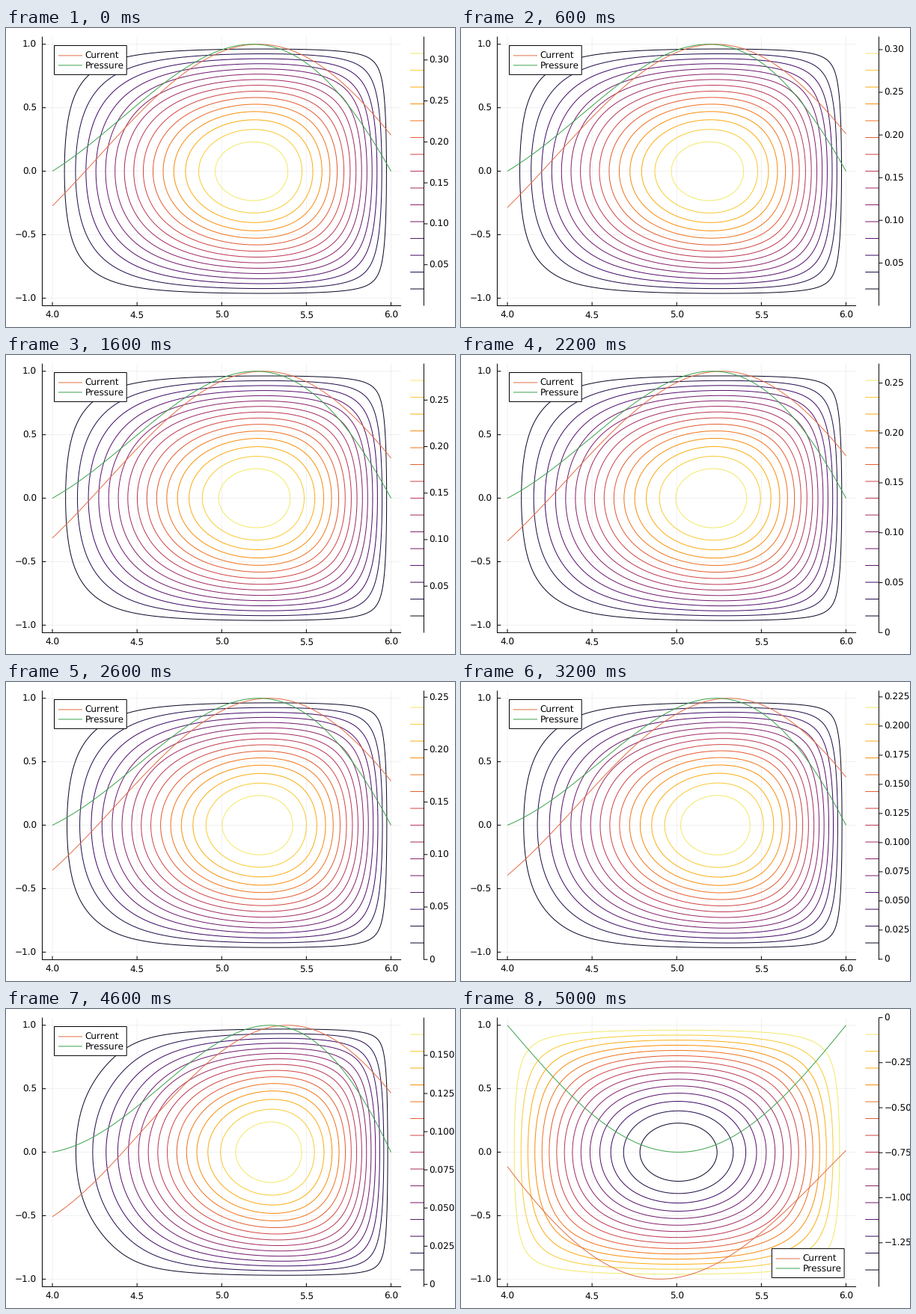
A matplotlib script that plays this animation: 600x400 px, repeating every 10 s.

```python
import math

import matplotlib.pyplot as plt
import numpy as np
from matplotlib.animation import FuncAnimation
from matplotlib.patches import Rectangle

plt.rcParams.update({"path.snap": False, "text.hinting": "none",
                     "text.hinting_factor": 1,
                     "lines.solid_capstyle": "butt"})

W, H, DPI = 600, 400, 100
PX = 72 / DPI                      # one pixel in points
FONT = dict(family="DejaVu Sans", size=12.0 * PX, color="black")
LEFT, TOP, SIDE_X, SIDE_Y = 48.45, 11.55, 479.6, 360
BOTTOM, RIGHT = TOP + SIDE_Y, LEFT + SIDE_X
ORANGE, GREEN = "#E36F47", "#3DA44E"
BAR_X0, BAR_X1 = 540.2, 558.4
LEVELS = 15
SWEEP = 25                         # frames before the jump to the last state
ZERO_BELOW = 0.27                  # the bar marks zero only for weaker peaks

# Flux equation: R d/dR(1/R dpsi/dR) + d2psi/dz2 = -(a R^2 - b + c psi)
r = np.linspace(4, 6, 161)
z = np.linspace(-1, 1, 161)
MID = len(z) // 2


def px(radius):
    return LEFT + SIDE_X * (0.5 + (radius - 5) / 2.12)


def py(height):
    return TOP + SIDE_Y * (0.5 - height / 2.12)


def responses(c, modes=24):
    """Flux driven by the sources R^2 and 1, as a cosine series in z."""
    inner, h = r[1:-1], r[1] - r[0]
    n = len(inner)
    op = (np.diag(np.full(n, -2 / h**2))
          + np.diag(1 / h**2 - 1 / (2 * h * inner[:-1]), 1)
          + np.diag(1 / h**2 + 1 / (2 * h * inner[1:]), -1))
    src = np.stack([inner**2, np.ones(n)], axis=1)
    out = np.zeros((2, len(z), len(r)))
    for m in range(modes):
        mu = (2 * m + 1) * math.pi / 2
        amp = 2 * (-1) ** m / mu
        g = np.linalg.solve(-op - (c - mu**2) * np.eye(n), amp * src)
        for i in range(2):
            out[i, :, 1:-1] += np.outer(np.cos(mu * z), g[:, i])
    out[:, [0, -1], :] = 0
    return out


def balance(a, c, peak, basis):
    """Choose b so that the flux on the axis equals peak."""
    u, v = basis
    extreme = np.max if peak > 0 else np.min
    lo, hi = 0.0, 4.0
    for _ in range(45):
        b = (lo + hi) / 2
        if extreme(a * u[MID] - b * v[MID]) > peak:
            lo = b
        else:
            hi = b
    psi = a * u - b * v
    current = a * r - b / r + c * psi[MID] / r
    pressure = psi[MID] - psi[MID].min()
    return psi, current / np.abs(current).max(), pressure / pressure.max()


def build_states():
    a, c = 0.0454, 4.688
    basis = responses(c)
    peaks = np.interp(np.arange(SWEEP), [0, 3, 8, 13, 19, 23, 24],
                      [0.3285, 0.3152, 0.2892, 0.2562, 0.2045, 0.1747, 0.167])
    states = [balance(a, c, p, basis) for p in peaks]
    a, c = 0.0393, 4.631
    states.append(balance(a, c, -1.494, responses(c)))
    return states


STATES = build_states()

fig = plt.figure(figsize=(W / DPI, H / DPI), dpi=DPI, facecolor="white")
ax = fig.add_axes([0, 0, 1, 1])
ax.set_xlim(0, W)
ax.set_ylim(H, 0)
ax.axis("off")


def line(xs, ys, color="black", **kw):
    return ax.plot(xs, ys, color=color, lw=PX, **kw)[0]


def label(x, y, text, ha="left", **kw):
    return ax.text(x, y + 4.3, text, ha=ha, va="baseline", **FONT, **kw)


def number(value, digits):
    return f"{value:.{digits}f}".replace("-", "\u2212")


def draw_frame():
    for t in np.arange(4, 6.1, 0.5):
        x = px(t)
        line([x, x], [TOP, BOTTOM], alpha=0.06, zorder=1)
        line([x, x], [BOTTOM, BOTTOM - 4.8], zorder=4)
        label(x, 383.3, number(t, 1), ha="center")
    for t in np.arange(-1, 1.1, 0.5):
        y = py(t)
        line([LEFT, RIGHT], [y, y], alpha=0.06, zorder=1)
        line([LEFT, LEFT + 4.8], [y, y], zorder=4)
        label(41.2, y, number(t, 1), ha="right")
    line([LEFT, LEFT, RIGHT], [TOP, BOTTOM, BOTTOM], zorder=4)
    line([BAR_X1, BAR_X1], [TOP, BOTTOM], zorder=4)


def legend(x, y):
    box = Rectangle((x, y), 96.7, 38.9, fc="white", ec="black",
                    lw=PX, zorder=5)
    parts = [ax.add_patch(box)]
    for i, (name, color) in enumerate([("Current", ORANGE),
                                       ("Pressure", GREEN)]):
        row = y + 13.4 + 13 * i
        parts.append(line([x + 5.3, x + 37.5], [row, row], color, zorder=6))
        parts.append(label(x + 41, row, name, zorder=6))
    return parts


def color_bar(psi, levels, colors):
    lo, hi = psi.min(), psi.max()
    span = hi - lo

    def bar_y(v):
        return BOTTOM - SIDE_Y * (v - lo) / span

    parts = [line([BAR_X0, BAR_X1], [bar_y(v)] * 2, col)
             for v, col in zip(levels, colors)]
    power = math.floor(math.log10(span))
    wide = span > 2.5 * 10.0**power
    step = (0.5 if wide else 0.25) * 10.0**power
    digits = (1 if wide else 2) - power
    first = math.ceil(lo / step - 1e-6)
    last = math.floor(hi / step + 1e-6)
    for n in range(first, last + 1):
        if n == 0 and hi > ZERO_BELOW:
            continue
        y = bar_y(n * step)
        parts.append(line([BAR_X1, BAR_X1 + 5], [y, y], zorder=4))
        parts.append(label(565.4, y, number(n * step, digits) if n else "0"))
    return parts


draw_frame()
current_line = line([], [], ORANGE, zorder=3)
pressure_line = line([], [], GREEN, zorder=3)
moving = []


def update(i):
    while moving:
        moving.pop().remove()
    k = min(i, SWEEP)
    psi, current, pressure = STATES[k]
    levels = np.linspace(psi.min(), psi.max(), LEVELS + 2)[1:-1]
    colors = plt.get_cmap("inferno")(np.arange(1, LEVELS + 1) / (LEVELS + 1))
    moving.append(ax.contour(px(r), py(z), psi, levels=levels, colors=colors,
                             linewidths=PX, linestyles="solid", zorder=2))
    moving.extend(color_bar(psi, levels, colors))
    moving.extend(legend(*((415.4, 320.6) if k == SWEEP else (64.5, 23.5))))
    current_line.set_data(px(r), py(current))
    pressure_line.set_data(px(r), py(pressure))
    return []


anim = FuncAnimation(fig, update, frames=50, interval=200, repeat=True,
                     repeat_delay=0, init_func=lambda: [], blit=False)
plt.show()
```
